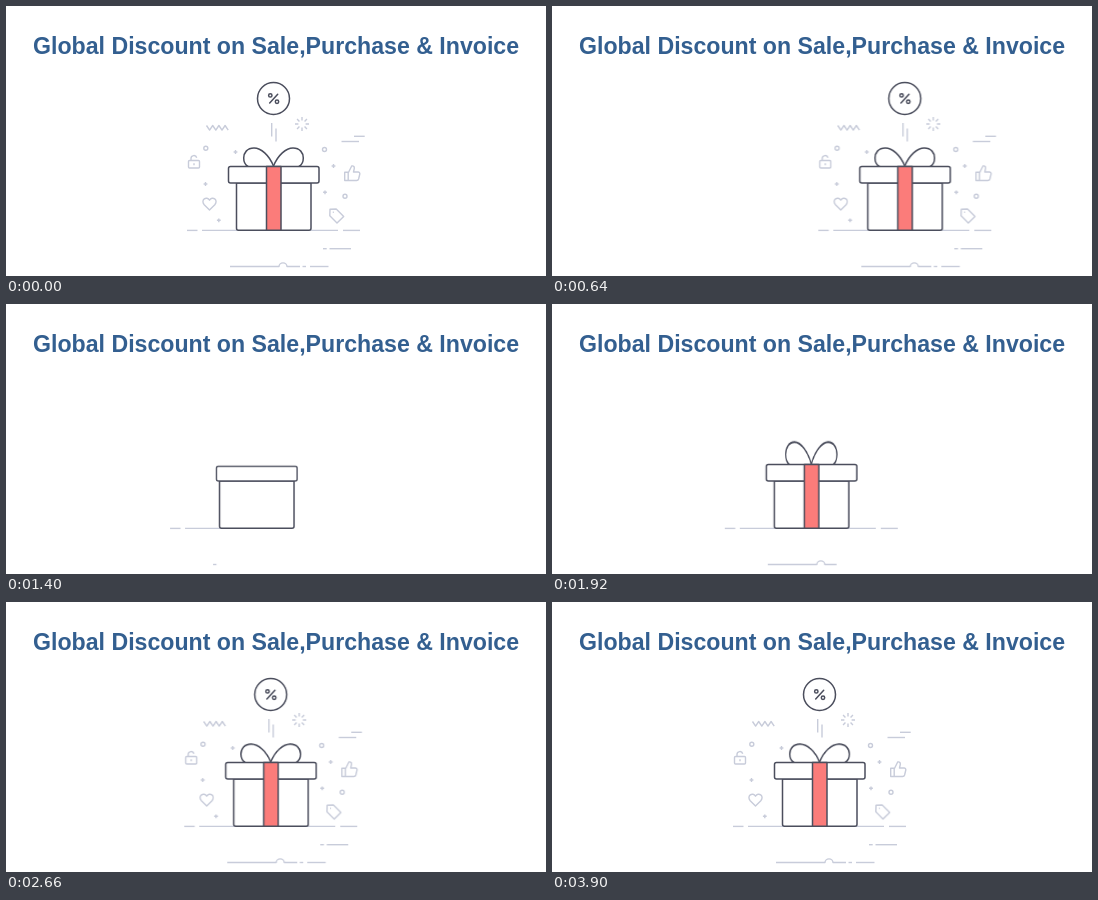
Recreate the animation shown at these times as an HTML page. Size 540 px wide and 270 px high, loop 4200 ms.

```html
<!DOCTYPE html>
<html lang="en">
<head>
<meta charset="utf-8">
<title>Global Discount</title>
<style>
  html, body { margin: 0; width: 100%; height: 100%; overflow: hidden; background: #fff; }
  svg { display: block; width: 540px; height: 270px; }
  text { font: bold 23.15px "Liberation Sans", Arial, sans-serif; fill: #335f90; }
  .light { fill: none; stroke: #c8ccda; stroke-width: 1.4; stroke-linejoin: round; }
  .dark { fill: #fff; stroke: #4b4e5d; stroke-width: 1.5; stroke-linejoin: round; stroke-linecap: round; }
  .red { fill: #fb7c7a; }
</style>
</head>
<body>
<svg viewBox="0 0 540 270">
  <text x="27" y="48">Global Discount on Sale,Purchase &amp; Invoice</text>
  <g id="scene">
    <g id="lines" class="light"></g>
    <g id="bits" class="light"></g>
    <g id="coin" class="dark">
      <circle cx="267.5" cy="92.5" r="16"/>
      <path d="M263.7 97L271.7 88.2"/>
      <circle cx="264.3" cy="89.4" r="1.7"/>
      <circle cx="271" cy="95.8" r="1.7"/>
    </g>
    <g id="bow" class="dark">
      <path d="M267.5 160C263 149 255 142 248 142C241 142 237.7 147 237.7 152C237.7 156 239.5 159 242 160.5"/>
      <path d="M267.5 160C272 149 280 142 287 142C294 142 297.3 147 297.3 152C297.3 156 295.5 159 293 160.5"/>
    </g>
    <path id="body" class="dark" d="M230.5 177H305V222.3q0 2-2 2H232.5q-2 0-2-2z"/>
    <rect id="lid" class="dark" x="222.5" y="160.5" width="90.5" height="16.5" rx="2"/>
    <rect id="ribbon" class="dark red" x="260.5" y="160.5" width="14.5" height="63.8"/>
  </g>
</svg>
<script>
const LOOP = 4200, CUT = 720;
const $ = id => document.getElementById(id);

function animate(el, frames) {
  el.animate(frames.map(([t, style, easing = 'linear']) => ({ offset: t / LOOP, easing, ...style })),
    { duration: LOOP, iterations: Infinity });
}

// Holds the finished pose until the cut, then builds up through the steps.
function build(el, steps) {
  const first = steps[0][1], last = steps[steps.length - 1][1];
  animate(el, [[0, last], [CUT, last], [CUT, first], ...steps, [LOOP, last]]);
}

function transform(el, x, y, steps) {
  el.style.transformOrigin = `${x}px ${y}px`;
  build(el, steps.map(([t, value, easing]) => [t, { transform: value }, easing]));
}

function add(parent, d) {
  const el = document.createElementNS('http://www.w3.org/2000/svg', 'path');
  el.setAttribute('d', d);
  return $(parent).appendChild(el);
}

function trace(d, from, to) {
  const el = add('lines', d);
  el.setAttribute('pathLength', 1);
  el.style.strokeDasharray = '1 2';
  build(el, [[from, { strokeDashoffset: 1.01 }], [to, { strokeDashoffset: 0 }]]);
}

const pose = (x, y, s) => `translate(${x}px, ${y}px) scale(${s})`;
const ring = (x, y) => `M${x - 2} ${y}a2 2 0 1 1 4 0a2 2 0 1 1-4 0`;
const plus = (x, y) => `M${x - 1.9} ${y}h3.8M${x} ${y - 1.9}v3.8`;

// Flies outwards, passing the offset (dx, dy) at 2280 ms.
function fly(d, x, y, dx, dy, size = 1) {
  transform(add('bits', d), x, y, [
    [2110, pose(dx * 2.4, dy * 2.4, 0)],
    [2280, pose(dx, dy, size), 'ease-out'],
    [2540, pose(0, 0, 1)]
  ]);
}

function pop(d, x, y, start) {
  transform(add('bits', d), x, y, [
    [start, 'scale(0)', 'ease-out'],
    [start + 180, 'scale(1.06)', 'ease-in-out'],
    [start + 280, 'scale(1)']
  ]);
}

// Sideways drift: accelerates out, then glides in from the left.
const drift = [[0, 0]];
for (let t = 40; t <= CUT; t += 20) drift.push([t, 60 * ((t - 40) / 520) ** 2.43]);
drift.push([CUT, -52], [900, -38.5], [1120, -27], [1400, -17], [1660, -11.8], [1920, -8.2],
  [2280, -4.8], [2740, -2.4], [3240, -0.8], [3720, 0], [LOOP, 0]);
animate($('scene'), drift.map(([t, x]) => [t, { transform: `translateX(${x}px)` }]));

// Ground, drawn at an even speed from left to right.
const groundTime = x => 900 + (x - 181) * 4.5;
for (const [a, b] of [[181, 191.5], [196, 332], [337, 354]])
  trace(`M${a} 224.4H${b}`, groundTime(a), groundTime(b));

trace('M224 260.5H273a4 3.6 0 0 1 8 0H294', 1370, 1930);
trace('M296.5 260.5H300', 1960, 2010);
trace('M304 260.5H322.5', 2040, 2220);
trace('M317 242.7H320.7', 2200, 2270);
trace('M323.5 242.7H345', 2290, 2470);
trace('M335.5 135.5H353', 2130, 2290);
trace('M265.7 130.5V117', 2130, 2270);
trace('M270 135.5V122.5', 2150, 2280);
transform(add('lines', 'M348 130.3H358.7'), 348, 130.3, [
  [2200, 'translateX(-16px) scaleX(0)'],
  [2280, 'translateX(-16px) scaleX(.36)', 'ease-out'],
  [2500, 'translateX(0px) scaleX(1)']
]);

// Gift box
transform($('body'), 267.5, 224.3, [[980, 'scale(0)', 'ease-out'], [1250, 'scale(1)']]);
transform($('lid'), 267.5, 177, [[1290, 'scale(0)'], [1400, 'scale(.89)', 'ease-out'], [1480, 'scale(1)']]);
transform($('ribbon'), 267.5, 160.5, [[1500, 'scale(1, 0)', 'ease-out'], [1740, 'scale(1, 1)']]);
transform($('bow'), 267.5, 160, [
  [1680, 'scale(0, 0)', 'ease-out'],
  [1920, 'scale(.86, 1.22)', 'ease-in-out'],
  [2260, 'scale(1.06, .86)'],
  [2300, 'scale(1.06, .86)', 'ease-in-out'],
  [2520, 'scale(1, 1)']
]);
transform($('coin'), 267.5, 92.5, [
  [1940, pose(0, 85, 0)],
  [1960, pose(0, 85, .8), 'cubic-bezier(.3, .5, .5, 1)'],
  [2250, pose(0, 0, 1)]
]);

// Small decorations
let rays = '';
for (let i = 0; i < 8; i++) {
  const c = Math.cos(i * Math.PI / 4), s = Math.sin(i * Math.PI / 4);
  rays += `M${296 + 3.6 * c} ${118 + 3.6 * s}L${296 + 7 * c} ${118 + 7 * s}`;
}
fly(rays, 296, 118, 0, 0);
trace('M200.5 119.5' + 'l3.1 4.6l3.1-4.6'.repeat(3) + 'l3.1 4.6', 2100, 2270);
fly(ring(199.8, 142.3), 199.8, 142.3, 0.3, 0.7);
fly(ring(318.5, 143.5), 318.5, 143.5, -1.5, 0.7);
fly(ring(339, 190.2), 339, 190.2, -8, 5);
fly(plus(229.5, 146), 229.5, 146, 0, 1);
fly(plus(199.5, 178), 199.5, 178, 7.3, 2.2);
fly(plus(212.8, 214.3), 212.8, 214.3, 0, 0);
fly(plus(327.5, 160), 327.5, 160, -9.3, 4.2, 0.5);
pop(plus(319, 186.3), 319, 186.3, 2290);

// Icons: lock, thumb, heart, tag
pop('M183.5 154.5h9q1 0 1 1v5.5q0 1-1 1h-9q-1 0-1-1v-5.5q0-1 1-1zM185 154.5v-2a2.9 2.9 0 0 1 5.7-.8M188 157.2v2',
  188, 157, 2300);
pop('M338.7 166.2h3.5v8.3h-3.5zM342.2 167l3.5-7c2-.6 2.9 1 2.5 2.8l-.7 3.2h4.8q1.7.2 1.5 2l-1.2 5q-.4 1.5-2 1.5h-8.4',
  346, 168, 2330);
pop('M203.5 204l-5.3-5.3c-4-5 2.5-9 5.3-4.5c2.8-4.5 9.3-.5 5.3 4.5z', 203.5, 198, 2360);
pop('M324 203.2l6.2-.2L337.7 210.4L331 217L323.8 209.8zM326.8 206.3h1', 330.5, 210, 2390);
</script>
</body>
</html>
```
